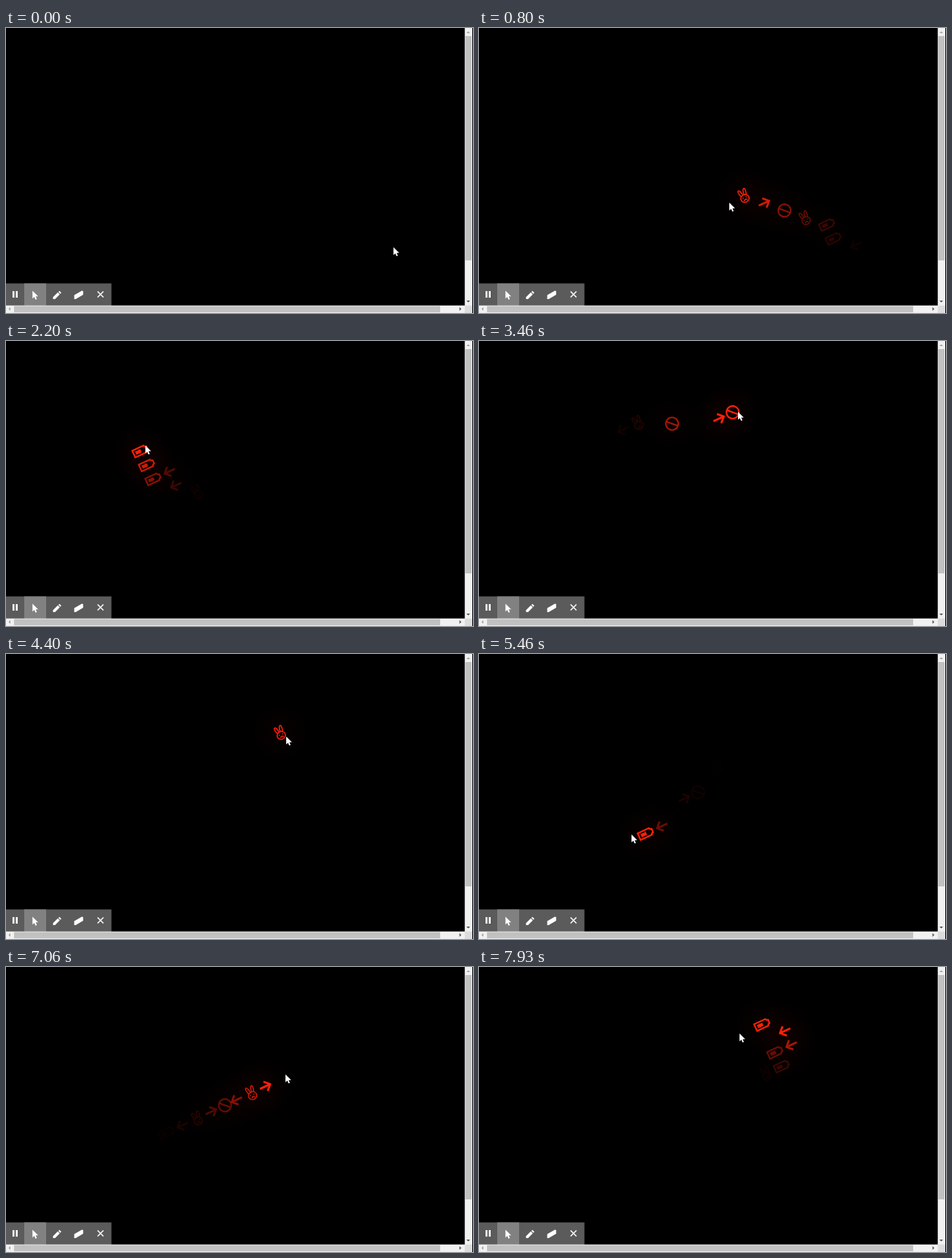
These frames come from a looping animation (640x390 px, 8 s). An HTML page with a canvas:

```html
<!DOCTYPE html>
<html lang="en">
<head>
<meta charset="utf-8">
<title>Icons under the pointer</title>
<style>
  html, body { margin: 0; width: 100%; height: 100%; overflow: hidden; background: #000; }
  canvas { display: block; }
</style>
</head>
<body>
<canvas id="stage" width="640" height="390"></canvas>
<script>
const ctx = document.getElementById('stage').getContext('2d');
const LOOP = 8000, STEPS = 120, FADE = 15;
const RED = '#ff2108';
const CELL = 21, ANGLE = -25 * Math.PI / 180, ORIGIN = { x: 262, y: 207 };
const HIT_RADIUS = 9, HALO_RADIUS = 42;

// Turning points of the pointer: step, x, y
const turns = [
  [0, 531, 300], [11, 364, 229], [12, 343, 239], [14, 334, 221], [16, 318, 227],
  [18, 309, 211], [21, 266, 207], [22, 262, 205], [26, 219, 184], [28, 203, 187],
  [32, 186, 152], [33, 191, 143], [40, 192, 121], [48, 264, 110], [50, 328, 105],
  [52, 355, 97], [66, 384, 113], [72, 283, 198], [75, 252, 235], [81, 222, 247],
  [82, 209, 247], [92, 191, 248], [97, 262, 207], [105, 365, 155], [106, 383, 147],
  [111, 415, 136], [113, 407, 118], [115, 428, 106], [117, 419, 88], [118, 389, 80],
  [119, 357, 91]
];

function pointerAt(step) {
  const n = Math.max(1, turns.findIndex(turn => turn[0] >= step));
  const [s0, x0, y0] = turns[n - 1], [s1, x1, y1] = turns[n];
  const p = (step - s0) / (s1 - s0);
  return { x: x0 + (x1 - x0) * p, y: y0 + (y1 - y0) * p };
}

function line(...points) {
  ctx.moveTo(points[0], points[1]);
  for (let i = 2; i < points.length; i += 2) ctx.lineTo(points[i], points[i + 1]);
}

function polygon(color, ...points) {
  ctx.beginPath();
  line(...points);
  ctx.closePath();
  ctx.fillStyle = color;
  ctx.fill();
}

function rect(color, x, y, w, h) {
  ctx.fillStyle = color;
  ctx.fillRect(x, y, w, h);
}

function stroke(width, draw) {
  ctx.lineWidth = width;
  ctx.beginPath();
  draw();
  ctx.stroke();
}

const arrow = dir => () => stroke(2.8, () => {
  line(-8 * dir, 0, 7 * dir, 0);
  line(0.5 * dir, -7, 7.5 * dir, 0, 0.5 * dir, 7);
});

const icons = {
  left: arrow(-1),
  right: arrow(1),
  ban() {
    stroke(2.2, () => {
      ctx.arc(0, 0, 8.6, 0, 7);
      line(-6, -6, 6, 6);
    });
  },
  battery() {
    stroke(2.2, () => {
      line(-10, -5, 7, -5, 8, -3, 10, -2.5, 10, 2.5, 8, 3, 7, 5, -10, 5);
      ctx.closePath();
    });
    ctx.fillRect(-7, -2.3, 8, 4.6);
  },
  bunny() {
    stroke(1.5, () => {
      ctx.ellipse(0, 4, 5.8, 5.3, 0, 0, 7);
      for (const side of [-1, 1]) {
        ctx.moveTo(side, -1);
        ctx.bezierCurveTo(side, -5, side * 2.5, -10, side * 4.6, -8.8);
        ctx.bezierCurveTo(side * 6, -7.5, side * 4.8, -3, side * 3.8, 0);
        line(side * 2.4, 2, side * 2.2, 3.6);
        line(0, 5, side * 2.4, 7);
      }
    });
  }
};

// Icons sit side by side in each row, starting with the battery.
const rowIcons = 'battery left bunny right ban left bunny right ban bunny battery left'.split(' ');
const widths = { battery: 1.45, left: 0.9 };
const cells = [];
let edge = -2.85;
for (const icon of rowIcons) {
  const width = widths[icon] || 1;
  const col = edge + width / 2 - (width === 1 ? 0 : 0.1);
  edge += width;
  const cos = Math.cos(ANGLE) * CELL, sin = Math.sin(ANGLE) * CELL;
  for (let row = -6; row <= 9; row++) {
    const x = ORIGIN.x + col * cos - row * sin;
    const y = ORIGIN.y + col * sin + row * cos;
    const hits = [];
    for (let step = 1; step < STEPS; step++) {
      const p = pointerAt(step);
      if (Math.hypot(p.x - x, p.y - y) < HIT_RADIUS) hits.push(step);
    }
    cells.push({ icon, x, y, hits });
  }
}

function glowOf(cell, step) {
  const last = cell.hits.filter(hit => hit < step).pop();
  if (last === undefined) return 0;
  const age = Math.max(0, step - 2 - last) / FADE;
  return age < 1 ? (1 - age) ** 3 : 0;
}

function drawCell({ icon, x, y }, level) {
  ctx.save();
  ctx.translate(x, y);
  ctx.globalAlpha = level;
  const halo = ctx.createRadialGradient(0, 0, 0, 0, 0, HALO_RADIUS);
  halo.addColorStop(0, 'rgba(255,25,0,.035)');
  halo.addColorStop(1, 'rgba(255,25,0,0)');
  rect(halo, -HALO_RADIUS, -HALO_RADIUS, 2 * HALO_RADIUS, 2 * HALO_RADIUS);
  ctx.rotate(ANGLE);
  ctx.strokeStyle = ctx.fillStyle = RED;
  icons[icon]();
  ctx.restore();
}

function drawPointer(x, y) {
  ctx.save();
  ctx.translate(x, y);
  polygon('#fff', 0, 0, 0, 10.8, 2.5, 8.5, 4.2, 12.2, 6, 11.4, 4.4, 7.8, 7.8, 7.8);
  ctx.restore();
}

function drawToolbar() {
  rect('#5b5b5b', 0, 349.5, 144.5, 30.5);
  rect('#818181', 25, 349.5, 30, 30.5);
  rect('#fff', 9, 360, 2.5, 9);
  rect('#fff', 13.5, 360, 2.5, 9);
  drawPointer(36.3, 359.5);
  polygon('#fff', 64.5, 371, 64.5, 368.3, 71, 361.8, 73.7, 364.5, 67.2, 371);
  polygon('#fff', 71.8, 361, 73.2, 359.7, 75.8, 362.2, 74.4, 363.7);
  polygon('#fff', 93.5, 365.5, 104, 359.5, 105.7, 360, 105.7, 365, 95.5, 371, 93.5, 371);
  ctx.strokeStyle = '#fff';
  stroke(1.5, () => {
    line(125.5, 360.5, 133.5, 368.5);
    line(133.5, 360.5, 125.5, 368.5);
  });
}

function drawScrollbars() {
  rect('#f1f1f1', 628.7, 0, 10.3, 390);
  rect('#f1f1f1', 0, 379.7, 639, 10.3);
  rect('#dcdcdc', 628.7, 379.7, 10.3, 10.3);
  rect('#c1c1c1', 629.5, 11, 8.5, 307);
  rect('#c1c1c1', 11, 380.5, 584, 8.5);
  polygon('#a3a3a3', 631, 7, 636, 7, 633.5, 4.5);
  polygon('#505050', 631, 373, 636, 373, 633.5, 375.5);
  polygon('#a3a3a3', 6, 382, 6, 387, 3.5, 384.5);
  polygon('#505050', 621.5, 382, 621.5, 387, 624, 384.5);
}

function frame(now) {
  // 15 steps a second, with step times cut to whole 10 ms
  const step = Math.min(STEPS - 1, Math.floor((now % LOOP + 6.7) * STEPS / LOOP));
  rect('#000', 0, 0, 640, 390);
  for (const cell of cells) {
    const level = glowOf(cell, step);
    if (level > 0.01) drawCell(cell, level);
  }
  drawToolbar();
  drawScrollbars();
  const { x, y } = pointerAt(step);
  drawPointer(x, y);
  requestAnimationFrame(frame);
}

requestAnimationFrame(frame);
</script>
</body>
</html>
```
